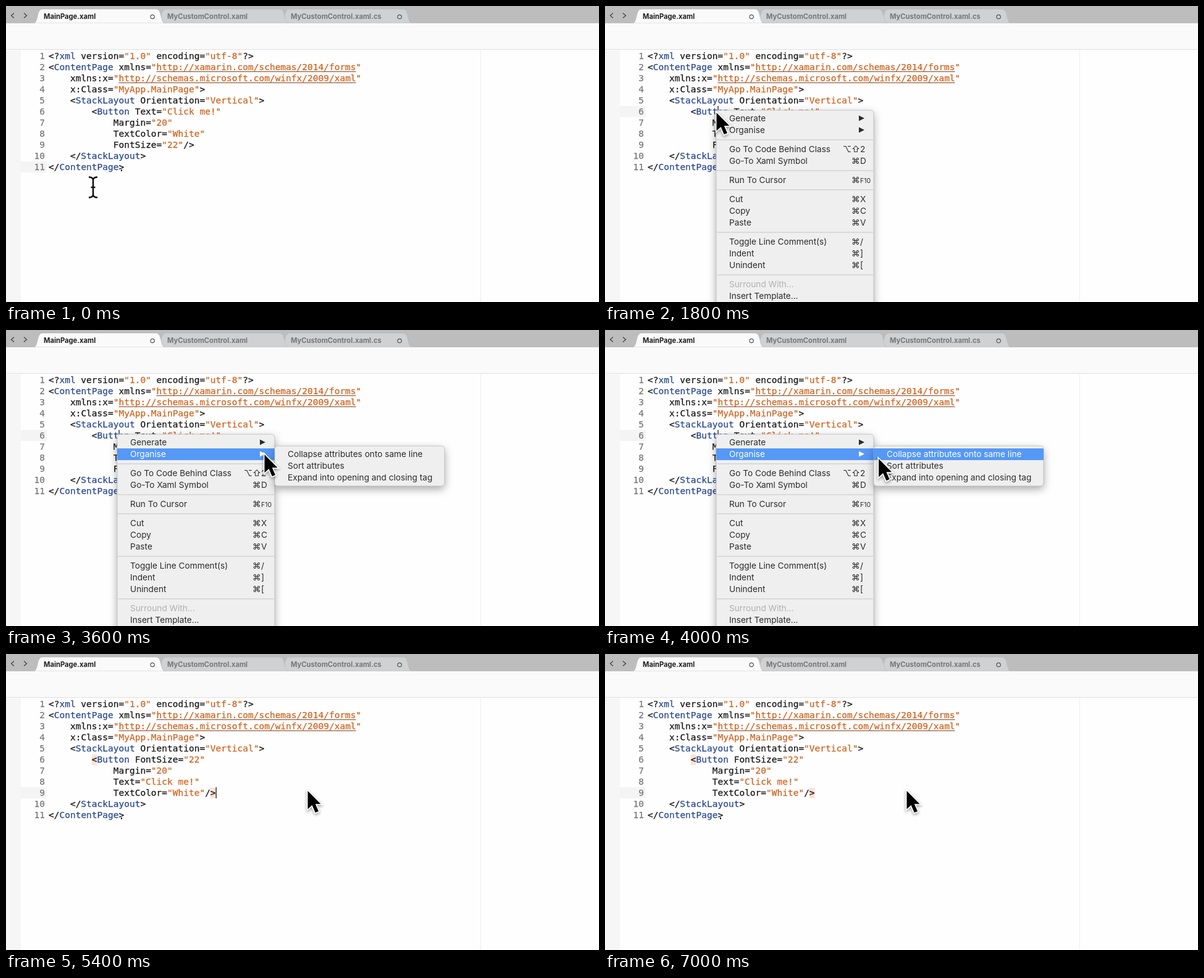
An HTML page with a canvas that plays this animation: 960 px wide and 480 px high, repeating every 7.2 s.

```html
<!DOCTYPE html>
<html lang="en">
<head>
<meta charset="utf-8">
<style>
html, body { margin: 0; width: 100%; height: 100%; overflow: hidden; background: #fefefe; }
canvas { display: block; }
</style>
</head>
<body>
<canvas id="stage" width="960" height="480"></canvas>
<script>
const ctx = document.getElementById('stage').getContext('2d');
const LOOP = 7200, STEP = 200;
const MENU_OPEN = 1400, SUBMENU_OPEN = 2600, MENU_CLOSE = 5200;
const CHAR = 8.729, CODE_X = 69, LINE = 18;
const CODE_FONT = '14.5px "DejaVu Sans Mono", monospace';
const MENU_FONT = '13.65px Inter, "DejaVu Sans", sans-serif';
const SMALL_FONT = '10.5px Inter, sans-serif';
const TAB_FONT = '700 11.2px Inter, sans-serif';
const INK = '#181818', BLUE = '#2b4a90', ORANGE = '#cf6420';

const head = [
  '<?xml version="1.0" encoding="utf-8"?>',
  '<ContentPage xmlns="http://xamarin.com/schemas/2014/forms"',
  '    xmlns:x="http://schemas.microsoft.com/winfx/2009/xaml"',
  '    x:Class="MyApp.MainPage">',
  '    <StackLayout Orientation="Vertical">'
];
const tail = ['    </StackLayout>', '</ContentPage>'];
const button = (first, ...rest) =>
  ['        <Button ' + first, ...rest.map(attr => ' '.repeat(12) + attr)];
const unsorted = [...head,
  ...button('Text="Click me!"', 'Margin="20"', 'TextColor="White"', 'FontSize="22"/>'), ...tail];
const sorted = [...head,
  ...button('FontSize="22"', 'Margin="20"', 'Text="Click me!"', 'TextColor="White"/>'), ...tail];

// An empty entry is a separator.
const menu = [
  ['Generate', '▶'], ['Organise', '▶'], [],
  ['Go To Code Behind Class', '⌥⇧2'], ['Go-To Xaml Symbol', '⌘D'], [],
  ['Run To Cursor', '⌘F10'], [],
  ['Cut', '⌘X'], ['Copy', '⌘C'], ['Paste', '⌘V'], [],
  ['Toggle Line Comment(s)', '⌘/'], ['Indent', '⌘]'], ['Unindent', '⌘['], [],
  ['Surround With...', '', true], ['Insert Template...', '']
];
const submenu = [
  ['Collapse attributes onto same line', ''], ['Sort attributes', ''],
  ['Expand into opening and closing tag', '']
];

// time, x, y
const path = [
  [200, 141, 294], [1200, 180, 172], [1800, 180, 172],
  [2600, 242, 193], [3600, 418, 201], [4600, 488, 221]
];

function pointerAt(t) {
  if (t <= path[0][0]) return path[0].slice(1);
  for (let i = 1; i < path.length; i++) {
    const [t0, x0, y0] = path[i - 1], [t1, x1, y1] = path[i];
    if (t > t1) continue;
    const p = (t - t0) / (t1 - t0), e = p * p * (3 - 2 * p);
    return [x0 + (x1 - x0) * e, y0 + (y1 - y0) * e];
  }
  return path[path.length - 1].slice(1);
}

function rect(x, y, w, h, color) {
  ctx.fillStyle = color;
  ctx.fillRect(x, y, w, h);
}

function text(str, x, y, font, color, align = 'left') {
  ctx.font = font;
  ctx.fillStyle = color;
  ctx.textAlign = align;
  ctx.fillText(str, x, y);
}

// Code glyphs get a hairline outline to look slightly heavier.
function codeText(str, x, y, color, align) {
  text(str, x, y, CODE_FONT, color, align);
  ctx.strokeStyle = color;
  ctx.lineWidth = 0.25;
  ctx.strokeText(str, x, y);
}

function stroke(d, color, width) {
  ctx.strokeStyle = color;
  ctx.lineWidth = width;
  ctx.stroke(new Path2D(d));
}

function tab(left, right, title, fill, color, modified) {
  const shape = new Path2D(`M${left} 28C${left + 8} 26 ${left + 4} 5 ${left + 14} 5` +
    `H${right - 14}C${right - 4} 5 ${right - 8} 26 ${right} 28Z`);
  ctx.fillStyle = fill;
  ctx.fill(shape);
  ctx.strokeStyle = '#b4b4b4';
  ctx.lineWidth = 0.6;
  ctx.stroke(shape);
  text(title, left + 16, 21, TAB_FONT, color);
  if (modified) stroke(`M${right - 23} 17.5a3.2 3.2 0 1 0 6.4 0a3.2 3.2 0 1 0 -6.4 0`, '#555', 1.2);
}

function drawWindow() {
  rect(0, 0, 960, 480, '#fefefe');
  rect(0, 0, 960, 28, '#bdbdbd');
  stroke('M13 11.5L8.5 15.5L13 19.5M29 11.5L33.5 15.5L29 19.5', '#484848', 1.4);
  tab(445, 657, 'MyCustomControl.xaml.cs', '#d0d1d2', '#777', true);
  tab(245, 457, 'MyCustomControl.xaml', '#d0d1d2', '#777', false);
  tab(45, 257, 'MainPage.xaml', '#fafafa', '#202020', true);
  rect(0, 28, 960, 42, '#fafafa');
  rect(0, 70, 960, 1, '#dedede');
  rect(0, 72, 24, 408, '#f6f6f6');
  rect(768, 72, 1, 408, '#efefef');
}

function drawCode(lines, activeLine) {
  rect(24, 72 + (activeLine - 1) * LINE, 42, LINE, '#f4f4f4');
  lines.forEach((line, row) => {
    const y = 86 + row * LINE;
    codeText(row + 1, 63, y, '#777', 'right');
    for (const token of line.matchAll(/"[^"]*"|<[\/?]?|(?<=<[\/?]?)\w+|[^\s"<]+/g)) {
      const [str] = token, x = CODE_X + token.index * CHAR;
      const isTag = /<[\/?]?$/.test(line.slice(0, token.index));
      codeText(str, x, y, str[0] === '"' ? ORANGE : isTag ? BLUE : INK);
      if (str.includes('http')) rect(x + CHAR, y + 2, (str.length - 2) * CHAR, 1, '#85441d');
    }
  });
  rect(186, 265, 2, 3, INK);
}

function drawCaret(row, col, since, t) {
  if ((t - since) % 2000 < 1000) rect(CODE_X + col * CHAR, 72 + (row - 1) * LINE, 1.2, LINE, '#111');
}

function panel(x, y, w, h) {
  ctx.save();
  ctx.beginPath();
  ctx.roundRect(x, y, w, h, 5);
  ctx.shadowColor = 'rgba(0,0,0,.35)';
  ctx.shadowBlur = 14;
  ctx.shadowOffsetY = 5;
  ctx.fillStyle = '#efefef';
  ctx.fill();
  ctx.restore();
  ctx.strokeStyle = '#bbb';
  ctx.lineWidth = 0.8;
  ctx.stroke();
}

function shortcut(keys, y, color) {
  if (keys === '▶') {
    ctx.fillStyle = color;
    ctx.fill(new Path2D(`M411 ${y - 4.5}L420 ${y}L411 ${y + 4.5}Z`));
  } else if (keys === '⌘F10') {
    text('⌘', 399, y + 5, MENU_FONT, color);
    text('F10', 413, y + 5, SMALL_FONT, color);
  } else {
    [...keys].forEach((key, i) =>
      text(key, 413 - (keys.length - 1 - i) * 14, y + 5, MENU_FONT, color));
  }
}

function drawMenu(items, x, y, w, h, isActive) {
  panel(x, y, w, h);
  let mid = y + 13;
  for (const [label, keys, disabled] of items) {
    if (!label) {
      rect(x, mid - 4, w, 2, '#dadada');
      mid += 12;
      continue;
    }
    const active = isActive(label, mid);
    if (active) rect(x, mid - 9, w, 19, '#5598f6');
    const color = active ? '#fff' : disabled ? '#b0b0b0' : '#2b2b2b';
    text(label, x + 21, mid + 5, MENU_FONT, color);
    shortcut(keys, mid, color);
    mid += 19;
  }
}

function drawMenus(t, px, py) {
  const hover = mid => py >= mid - 9 && py < mid + 10;
  const open = t >= SUBMENU_OPEN;
  drawMenu(menu, 180, 169, 255, 330,
    (label, mid) => open ? label === 'Organise' : hover(mid) && py > 173);
  if (open) drawMenu(submenu, 435, 188, 275, 65, (label, mid) => px > 435 && hover(mid));
}

function drawArrow(x, y) {
  const shape = new Path2D('M.5 1V30.5L7.5 24L12.8 36.3L18 34L12.8 22.3H21.5Z');
  ctx.save();
  ctx.translate(x, y);
  ctx.save();
  ctx.shadowColor = 'rgba(0,0,0,.4)';
  ctx.shadowBlur = 4;
  ctx.shadowOffsetY = 2;
  ctx.strokeStyle = '#fff';
  ctx.lineWidth = 3.5;
  ctx.stroke(shape);
  ctx.restore();
  ctx.fillStyle = '#000';
  ctx.fill(shape);
  ctx.restore();
}

function drawIBeam(x, y) {
  const d = 'M-7 -16.5Q-1 -16.5 0 -12.5Q1 -16.5 7 -16.5M0 -13V13' +
    'M-7 16.5Q-1 16.5 0 12.5Q1 16.5 7 16.5M-3.5 0H3.5';
  ctx.save();
  ctx.translate(x, y);
  stroke(d, '#fff', 5);
  stroke(d, '#111', 2.6);
  ctx.restore();
}

function draw(t) {
  const [px, py] = pointerAt(t);
  const done = t >= MENU_CLOSE, clicked = t >= MENU_OPEN;
  drawWindow();
  if (done) {
    rect(CODE_X + 8 * CHAR, 163, CHAR, 17, '#fbe2d4');
    rect(CODE_X + 30 * CHAR, 217, CHAR, 17, '#fbe2d4');
  }
  drawCode(done ? sorted : unsorted, done ? 9 : clicked ? 6 : 11);
  if (done) drawCaret(9, 31, MENU_CLOSE, t);
  else if (clicked) drawCaret(6, 13, MENU_OPEN, t);
  if (clicked && !done) drawMenus(t, px, py);
  (clicked ? drawArrow : drawIBeam)(px, py);
}

function tick() {
  const t = performance.now() % LOOP;
  draw(Math.floor(t / STEP) * STEP);
  requestAnimationFrame(tick);
}
tick();
</script>
</body>
</html>
```
